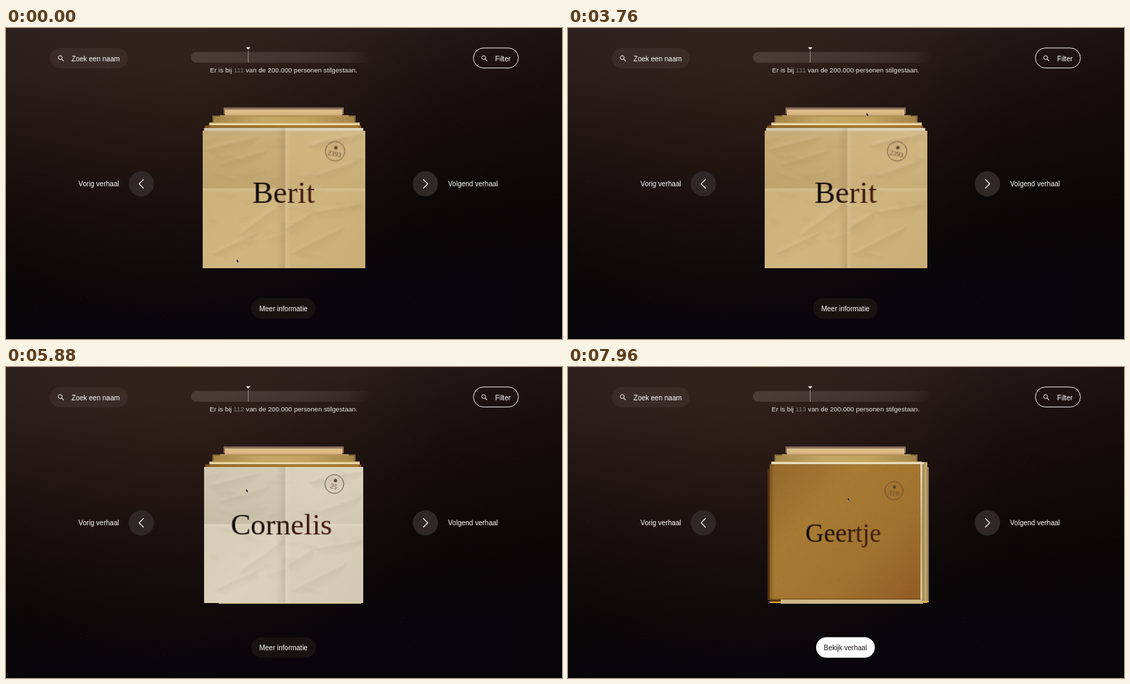
An HTML page with a canvas for the animation above (8000 ms loop, 800 by 448 pixels).

```html
<!DOCTYPE html>
<html lang="nl">
<head>
<meta charset="utf-8">
<title>Verhalen</title>
<style>
html, body { margin: 0; width: 100%; height: 100%; overflow: hidden; background: #0c0808; }
canvas { display: block; width: 100vw; height: 100vh; }
</style>
</head>
<body>
<canvas id="stage"></canvas>
<script>
const W = 800, H = 448, LOOP = 8000, SCALE = Math.max(1, window.devicePixelRatio || 1);
const SANS = '"Liberation Sans", Arial, sans-serif';
const SERIF = '"Liberation Serif", serif';
const stage = document.getElementById('stage');
stage.width = W * SCALE;
stage.height = H * SCALE;
const ctx = stage.getContext('2d');

const clamp = u => Math.min(1, Math.max(0, u));
const smooth = u => u * u * (3 - 2 * u);
const easeOut = u => 1 - (1 - u) * (1 - u);
const mix = (a, b, u) => a + (b - a) * u;

function seeded(seed) {
  return () => (seed = (seed * 16807) % 2147483647) / 2147483647;
}

function layer(w, h, paint) {
  const canvas = document.createElement('canvas');
  canvas.width = w * SCALE;
  canvas.height = h * SCALE;
  const g = canvas.getContext('2d');
  g.scale(SCALE, SCALE);
  paint(g, w, h);
  return canvas;
}

function ramp(g, x0, y0, x1, y1, colors) {
  const grad = g.createLinearGradient(x0, y0, x1, y1);
  colors.forEach((c, i) => grad.addColorStop(i / (colors.length - 1), c));
  return grad;
}

function box(g, x0, y0, x1, y1, fill) {
  g.fillStyle = fill;
  g.fillRect(x0, y0, x1 - x0, y1 - y0);
}

function pill(x, y, w, h, fill, stroke) {
  ctx.beginPath();
  ctx.roundRect(x, y, w, h, h / 2);
  if (fill) { ctx.fillStyle = fill; ctx.fill(); }
  if (stroke) { ctx.strokeStyle = stroke; ctx.lineWidth = 1; ctx.stroke(); }
}

function label(text, x, y, color = '#fff', align = 'left', size = 10) {
  ctx.font = `${size}px ${SANS}`;
  ctx.textAlign = align;
  ctx.fillStyle = color;
  ctx.fillText(text, x, y);
}

function line(g, points, color, width) {
  g.beginPath();
  points.forEach(([x, y]) => g.lineTo(x, y));
  g.strokeStyle = color;
  g.lineWidth = width;
  g.stroke();
}

// Smooth curve through [time, x, y] keys, at rest on both ends.
function follow(keys, t, k) {
  const last = keys.length - 1;
  if (t >= keys[last][0]) return keys[last][k];
  const i = keys.findIndex(p => p[0] > t) - 1;
  const slope = n => n === 0 || n === last ? 0
    : (keys[n + 1][k] - keys[n - 1][k]) / (keys[n + 1][0] - keys[n - 1][0]);
  const a = keys[i], b = keys[i + 1], d = b[0] - a[0], u = (t - a[0]) / d;
  return mix(a[k], b[k], smooth(u))
    + d * u * (1 - u) * (slope(i) * (1 - u) - slope(i + 1) * u);
}

const backdrop = layer(W, H, g => {
  box(g, 0, 0, W, H, ramp(g, 0, 0, 60, H,
    ['#2b1f1c', '#271b18', '#1e1310', '#160d0b', '#0f0909', '#0a0708', '#08060a']));
  const glow = g.createRadialGradient(270, 90, 20, 270, 90, 360);
  glow.addColorStop(0, 'rgba(96,62,50,.2)');
  glow.addColorStop(0.5, 'rgba(96,62,50,.1)');
  glow.addColorStop(1, 'rgba(96,62,50,0)');
  box(g, 0, 0, W, H, glow);
  box(g, 500, 0, W, H, ramp(g, 500, 0, W, 0, ['rgba(8,4,4,0)', 'rgba(8,4,4,.2)']));
  const rnd = seeded(77);
  for (let i = 0; i < 900; i++) {
    g.fillStyle = `rgba(190,145,125,${0.02 + rnd() * 0.07})`;
    g.beginPath();
    g.arc(rnd() * W, rnd() * H, 0.3 + rnd() * 0.6, 0, 7);
    g.fill();
  }
});

// A wrinkle: a line with a soft shade falling off to one side.
function wrinkle(g, x0, y0, x1, y1, depth, rgb, alpha) {
  const len = Math.hypot(x1 - x0, y1 - y0);
  const nx = -(y1 - y0) / len * depth, ny = (x1 - x0) / len * depth;
  g.fillStyle = ramp(g, x0, y0, x0 + nx, y0 + ny, [`rgba(${rgb},${alpha})`, `rgba(${rgb},0)`]);
  g.beginPath();
  g.moveTo(x0, y0);
  g.lineTo(x1, y1);
  g.lineTo(mix(x0, x1, 0.7) + nx, mix(y0, y1, 0.7) + ny);
  g.lineTo(mix(x0, x1, 0.2) + nx, mix(y0, y1, 0.2) + ny);
  g.fill();
}

function crumpled(light, base, shade) {
  const shine = '255,248,225';
  return (g, w, h) => {
    box(g, 0, 0, w, h, ramp(g, 0, 0, w, h, [base, light, base]));
    const fold = h * 0.42, mid = w * 0.51;
    box(g, 0, 0, mid, fold, ramp(g, 0, 0, 0, fold, [`rgba(${shade},.02)`, `rgba(${shade},.13)`]));
    box(g, mid, 0, w, fold, ramp(g, 0, 0, 0, fold, [`rgba(${shine},.04)`, `rgba(${shade},.06)`]));
    g.filter = 'blur(1px)';
    [[4, 28, 84, 8, 15], [22, 50, 96, 28, 12], [150, 22, 233, 4, 16], [160, 66, 228, 42, 14],
     [50, 152, 116, 104, 18], [118, 143, 158, 118, 20], [158, 118, 230, 106, 14],
     [126, 178, 206, 138, 16], [14, 178, 82, 146, 14]
    ].forEach(([a, b, c, d, e]) => {
      wrinkle(g, a, b, c, d, e, shade, 0.07);
      wrinkle(g, a, b, c, d, -e * 0.5, shine, 0.11);
    });
    const rnd = seeded(31);
    for (let i = 0; i < 34; i++) {
      const x = rnd() * w, y = rnd() * h, l = 12 + rnd() * 32, a = -0.45 + rnd() * 0.8;
      const ex = x + l * Math.cos(a), ey = y + l * Math.sin(a);
      wrinkle(g, x, y, ex, ey, 5 + rnd() * 9, shade, 0.035);
      wrinkle(g, x, y, ex, ey, -4 - rnd() * 4, shine, 0.05);
    }
    g.filter = 'none';
    box(g, mid - 13, 0, mid, h, ramp(g, mid - 13, 0, mid, 0, [`rgba(${shade},0)`, `rgba(${shade},.15)`]));
    box(g, mid, 0, mid + 8, h, ramp(g, mid, 0, mid + 8, 0, [`rgba(${shine},.15)`, `rgba(${shine},0)`]));
    box(g, 0, fold, w, fold + 6, ramp(g, 0, fold, 0, fold + 6, [`rgba(${shine},.2)`, `rgba(${shine},0)`]));
  };
}

function cardboard(g, w, h) {
  box(g, 0, 0, w, h, ramp(g, 0, 0, w, h, ['#94692b', '#a87b34', '#a17330', '#915b25']));
  const rnd = seeded(9);
  for (let i = 0; i < 1500; i++) {
    g.fillStyle = rnd() < 0.5 ? 'rgba(70,40,8,.09)' : 'rgba(230,180,90,.06)';
    g.fillRect(rnd() * w, rnd() * h, 1 + rnd(), 0.8);
  }
  box(g, 0, 0, 7, h, ramp(g, 0, 0, 7, 0, ['rgba(50,25,5,.35)', 'rgba(50,25,5,0)']));
  box(g, 0, h - 2, w, h, 'rgba(80,35,10,.35)');
}

function makeCard({ w, h, paint, name, size, nx, ny, stamp }) {
  return layer(w, h, g => {
    paint(g, w, h);
    g.font = `${size}px ${SERIF}`;
    g.textAlign = 'center';
    const half = g.measureText(name).width / 2;
    g.fillStyle = ramp(g, nx - half, 0, nx + half, 0, ['#0a0807', '#1a0f0a', '#3a180a', '#471c0a']);
    g.fillText(name, nx, ny);
    const ink = '#5a442f';
    g.translate(stamp.x, stamp.y);
    g.rotate(stamp.turn);
    g.strokeStyle = ink;
    g.lineWidth = 0.8;
    g.beginPath();
    g.arc(0, 0, stamp.r, 0, 7);
    g.stroke();
    g.fillStyle = ink;
    g.beginPath();
    g.arc(0, -5.3, 2.4, 0, 7);
    g.fill();
    g.font = `${stamp.size}px ${SERIF}`;
    g.fillText(stamp.text, 0, 7);
  });
}

const cards = [
  { x: 282.5, y: 147.5, w: 234, h: 198.5, leave: 4820, name: 'Berit', size: 45, nx: 117, ny: 103.5,
    paint: crumpled('#d0b781', '#c9ae76', '100,72,30'),
    stamp: { x: 191, y: 30, r: 14, turn: 0.22, text: '2393', size: 10 } },
  { x: 284.5, y: 144, w: 229.5, h: 195.5, leave: 6800, name: 'Cornelis', size: 43, nx: 111.5, ny: 97,
    paint: crumpled('#dcd2bd', '#d3c8b1', '105,88,65'),
    stamp: { x: 187.5, y: 24.5, r: 13.5, turn: 0.3, text: '25', size: 10 } },
  { x: 289.5, y: 139.5, w: 217, h: 195.5, leave: Infinity, name: 'Geertje', size: 37, nx: 106.5, ny: 111.5,
    paint: cardboard,
    stamp: { x: 179.5, y: 38.5, r: 13, turn: 0.15, text: '319', size: 10 } }
];
for (const card of cards) card.image = makeCard(card);

// A card is lifted clear of the pile, then tucked away behind it.
const LIFT = 510, TUCK = 290, RISE = 202.5, TILT = 2.4 * Math.PI / 180;
const BACK = { y: 192, scale: 0.71 };

const isBehind = (card, t) => t >= card.leave + LIFT;

function drawCard(card, t) {
  const age = t - card.leave;
  if (age >= LIFT + TUCK) return;
  const up = easeOut(clamp(age / LIFT));
  const back = smooth(clamp((age - LIFT) / TUCK));
  const home = card.y + card.h / 2;
  const scale = mix(1, BACK.scale, back);
  ctx.save();
  ctx.translate(card.x + card.w / 2, mix(home - RISE * up, BACK.y, back));
  ctx.rotate(TILT * up * (1 - back));
  ctx.scale(scale, scale);
  ctx.drawImage(card.image, -card.w / 2, -card.h / 2, card.w, card.h);
  ctx.restore();
}

function drawPile(t) {
  const behind = cards.filter(card => isBehind(card, t));
  const front = cards.filter(card => !isBehind(card, t)).reverse();
  behind.forEach(card => drawCard(card, t));

  box(ctx, 313, 114.5, 486, 124, '#8b7158');
  box(ctx, 315, 117.5, 484, 127, ramp(ctx, 0, 117, 0, 126, ['#e2c292', '#d6b27f']));
  box(ctx, 297, 126, 503, 136, '#806638');
  box(ctx, 308, 125.5, 493, 128, '#b3945a');
  box(ctx, 299, 128, 501, 137, ramp(ctx, 299, 0, 501, 0, ['#a58547', '#c5a765', '#c2a25d', '#a58547']));
  box(ctx, 292.5, 136, 509, 141, ramp(ctx, 0, 136, 0, 141, ['#b99a58', '#f0dfb0', '#e0c78d']));
  box(ctx, 306, 334, 511, 341, '#d5c08a');

  if (t > cards[1].leave + LIFT / 2) {
    box(ctx, 509, 137, 517, 340, ramp(ctx, 509, 0, 517, 0, ['#86693d', '#b99e69', '#c7af7b']));
    box(ctx, 516, 144, 519, 339, '#a18855');
    box(ctx, 293, 137, 512, 140, '#e7dbb8');
    box(ctx, 505, 139, 510, 340, ramp(ctx, 0, 139, 0, 340, ['#e3d5b2', '#c5ac77', '#d8c694']));
    box(ctx, 287, 147, 291, 336, '#51310f');
    box(ctx, 290, 335, 306, 339, '#5b3510');
    box(ctx, 290, 338, 306, 340, '#dfa63a');
    box(ctx, 509, 337, 519, 339, '#dfb251');
    box(ctx, 306, 334, 510, 341, '#cdb987');
  } else {
    box(ctx, 286.5, 140.5, 511, 145, ramp(ctx, 286, 0, 511, 0, ['#82501c', '#b3702c', '#99591d']));
  }
  front.forEach(card => drawCard(card, t));
}

function magnifier(x, y) {
  ctx.beginPath();
  ctx.arc(x, y, 2.8, 0, 7);
  ctx.strokeStyle = '#f2efed';
  ctx.lineWidth = 1;
  ctx.stroke();
  line(ctx, [[x + 2, y + 2], [x + 5, y + 5]], '#f2efed', 1.1);
}

function arrowButton(x, dir) {
  pill(x - 18.2, 206.3, 36.4, 36.4, '#302826');
  line(ctx, [[x - 3.2 * dir, 218], [x + 3.3 * dir, 224.5], [x - 3.2 * dir, 231]], '#fff', 1.1);
}

function drawCounter(t) {
  const count = 111 + cards.filter(card => t >= card.leave + LIFT * 0.7).length;
  const fill = ctx.createLinearGradient(266, 0, 524, 0);
  fill.addColorStop(0, 'rgba(255,245,240,.13)');
  fill.addColorStop(0.6, 'rgba(255,245,240,.1)');
  fill.addColorStop(0.88, 'rgba(255,245,240,.07)');
  fill.addColorStop(1, 'rgba(255,245,240,0)');
  pill(266, 34.5, 258, 15.5, fill);
  line(ctx, [[348.5, 33], [348.5, 50]], '#8f8682', 1);
  ctx.fillStyle = '#fff';
  ctx.beginPath();
  ctx.moveTo(345.3, 27.7);
  ctx.lineTo(351.7, 27.7);
  ctx.lineTo(348.5, 31.2);
  ctx.fill();

  const parts = [['Er is bij ', '#e8e4e1'], [String(count), '#807773'],
    [' van de 200.000 personen stilgestaan.', '#e8e4e1']];
  ctx.font = `9.65px ${SANS}`;
  const widths = parts.map(p => ctx.measureText(p[0]).width);
  let x = 399.5 - widths.reduce((a, b) => a + b) / 2;
  parts.forEach(([text, color], i) => {
    label(text, x, 63.5, color, 'left', 9.65);
    x += widths[i];
  });
}

function drawAction(t) {
  const u = clamp((t - 7300) / 400), s = smooth(u);
  const w = 93 - 8.5 * s, swell = Math.sin(u * Math.PI);
  ctx.globalAlpha = 1 - s;
  pill(399.2 - w / 2, 389.3, w, 29.5, '#171313');
  label('Meer informatie', 399.2, 408, '#fff', 'center');
  ctx.globalAlpha = s;
  pill(399.2 - w / 2 - swell, 389.3 - swell, w + 2 * swell, 29.5 + 2 * swell, '#fff');
  label('Bekijk verhaal', 399.2, 408, '#1a1513', 'center');
  ctx.globalAlpha = 1;
}

const pointer = [
  [0, 332, 333], [1240, 545, 309], [2760, 427, 319], [3760, 429.5, 122],
  [5320, 372, 206], [6680, 323.5, 121.5], [7960, 402.5, 188]
];

function drawPointer(t) {
  if (t > 2660 && t < 2880) {
    ctx.beginPath();
    ctx.arc(426.3, 318.3, 7.8, 0, 7);
    ctx.strokeStyle = '#463b2c';
    ctx.lineWidth = 0.9;
    ctx.stroke();
  }
  ctx.save();
  ctx.translate(follow(pointer, t, 1), follow(pointer, t, 2));
  ctx.beginPath();
  [[0, 0], [0, 4.5], [1, 3.6], [1.8, 5.4], [2.6, 5], [1.8, 3.3], [3.1, 3.2]].forEach(p => ctx.lineTo(...p));
  ctx.closePath();
  ctx.strokeStyle = 'rgba(235,230,222,.75)';
  ctx.lineWidth = 0.9;
  ctx.stroke();
  ctx.fillStyle = '#0b0a0d';
  ctx.fill();
  ctx.restore();
}

function draw(t) {
  ctx.setTransform(SCALE, 0, 0, SCALE, 0, 0);
  ctx.drawImage(backdrop, 0, 0, W, H);
  drawCounter(t);
  pill(63, 29, 112, 29, 'rgba(255,235,225,.055)');
  magnifier(78, 42.6);
  label('Zoek een naam', 94.3, 47.5);
  pill(672.5, 28.8, 64.8, 28.8, null, 'rgba(255,255,255,.92)');
  magnifier(687.3, 42.6);
  label('Filter', 703.8, 47.5);
  label('Vorig verhaal', 104.3, 227.8);
  arrowButton(194.8, -1);
  arrowButton(603.5, 1);
  label('Volgend verhaal', 636, 227.8);
  drawAction(t);
  drawPile(t);
  drawPointer(t);
}

const start = performance.now();
function tick() {
  draw((performance.now() - start) % LOOP);
  requestAnimationFrame(tick);
}
tick();
</script>
</body>
</html>
```
